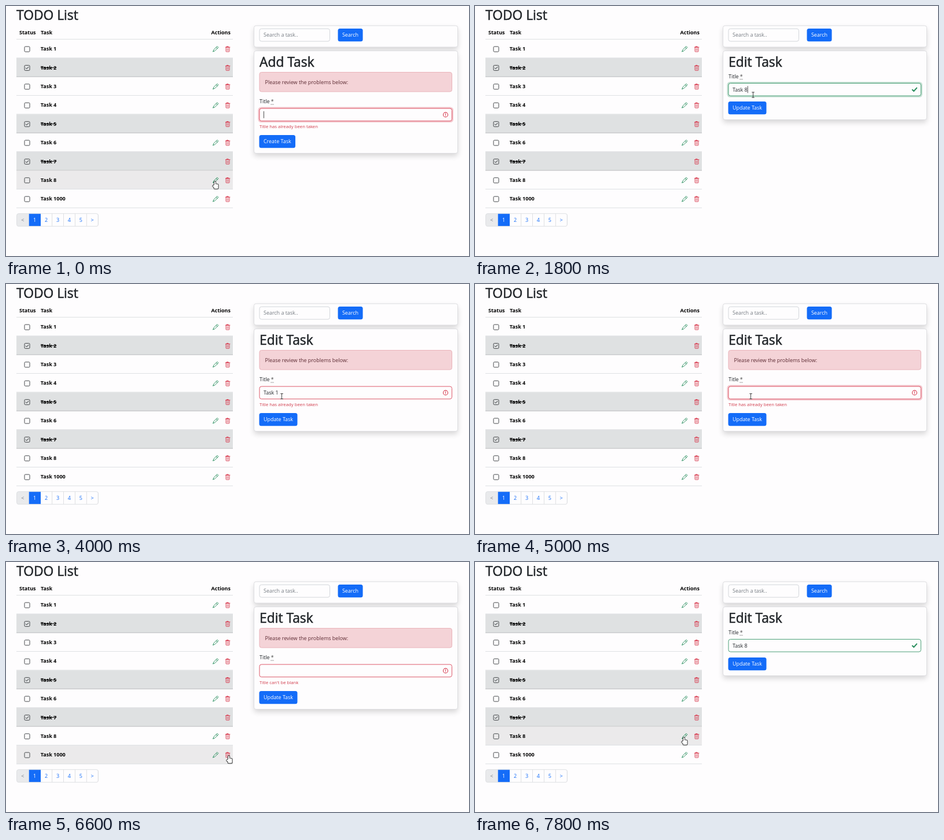
These frames come from a looping animation (800x432 px, 8000 ms). An HTML page with a canvas:

```html
<!DOCTYPE html>
<html lang="en">
<head>
<meta charset="utf-8">
<title>TODO List</title>
<style>
  html, body { margin: 0; width: 100%; height: 100%; overflow: hidden; background: #fefdfe; }
  canvas { display: block; }
</style>
</head>
<body>
<canvas id="stage" width="800" height="432"></canvas>
<script>
const ctx = document.getElementById('stage').getContext('2d');
const LOOP = 8000, STEP = 200, GLIDE = 500, BLINK = 1000;
const PAGE = '#fefdfe', INK = '#212529', BLUE = '#146cf8', HOVER_BLUE = '#0b5ed7';
const GREEN = '#2b8f5f', RED = '#d73c50', LINE = '#dee0e3', GREY = '#757b82';

const TABLE = { x: 18, w: 374, top: 57.1, row: 32.38 };
const TASKS = [1, 2, 3, 4, 5, 6, 7, 8, 1000];
const DONE = [2, 5, 7];
const PENCIL_X = 362, TRASH_X = 383;
const SEARCH = { x: 438, y: 39.3, w: 121.5, h: 21.7 };
const FIND = { x: 573.5, y: 39, w: 43, h: 22.3 };

// Each state adds its changes to the one before.
const TAKEN = 'Title has already been taken', BLANK = "Title can't be blank";
const EDIT = { mode: 'Edit', error: '', value: 'Task 8', eraseAt: Infinity, focus: false, busy: false };
const STATES = [
  [0, { ...EDIT, mode: 'Add', error: TAKEN, value: '', focus: true }],
  [400, EDIT],
  [1600, { focus: true }],
  [2200, { value: 'Task ' }],
  [2600, { value: 'Task 1' }],
  [3200, { focus: false, busy: true }],
  [3400, { error: TAKEN, busy: false }],
  [4200, { focus: true }],
  [4400, { eraseAt: 4400 }],
  [5600, { focus: false, busy: true }],
  [6000, { error: BLANK, busy: false }],
  [7200, EDIT]
];

// Places the pointer rests at, with the time it gets there.
const EDIT_ICON = { x: 361, y: 303.2 };
const STOPS = [
  { at: 0, ...EDIT_ICON },
  { at: 1400, x: 480.5, y: 153.5 },
  { at: 3400, x: 485, y: 175 },
  { at: 4000, x: 476.5, y: 194 },
  { at: 5500, x: 484, y: 234 },
  { at: 6600, x: 385, y: 335 },
  { at: 7000, ...EDIT_ICON }
];

function stateAt(t) {
  const s = { since: 0 };
  for (const [at, change] of STATES) if (at <= t) Object.assign(s, change, { since: at });
  const erased = Math.max(0, Math.floor((t - s.eraseAt) / STEP) + 1) * 2;
  if (erased) s.value = s.value.slice(0, Math.max(0, s.value.length - erased));
  return s;
}

function pointerAt(t) {
  let p = STOPS[0];
  for (let i = 1; i < STOPS.length; i++) {
    const a = STOPS[i - 1], b = STOPS[i];
    const begin = Math.max(a.at, b.at - GLIDE);
    if (t < begin) break;
    const u = Math.min(1, (t - begin) / (b.at - begin)), k = u * u * (3 - 2 * u);
    p = { x: a.x + (b.x - a.x) * k, y: a.y + (b.y - a.y) * k };
  }
  return p;
}

function text(str, x, y, { color = INK, size = 8.95, weight = 400, align = 'left' } = {}) {
  ctx.font = `${weight} ${size}px "Open Sans", "Noto Sans", sans-serif`;
  ctx.textAlign = align;
  ctx.fillStyle = color;
  ctx.fillText(str, x, y);
  return ctx.measureText(str).width;
}

// Medium weight: regular letters with a thin outline.
function heading(str, x, y) {
  text(str, x, y, { size: 22.8 });
  ctx.strokeStyle = INK;
  ctx.lineWidth = 0.55;
  ctx.strokeText(str, x, y);
}

function rect(x, y, w, h, color) {
  ctx.fillStyle = color;
  ctx.fillRect(x, y, w, h);
}

function box(b, fill, stroke, r = 3.5, width = 1) {
  ctx.beginPath();
  ctx.roundRect(b.x, b.y, b.w, b.h, r);
  if (fill) { ctx.fillStyle = fill; ctx.fill(); }
  if (stroke) { ctx.strokeStyle = stroke; ctx.lineWidth = width; ctx.stroke(); }
}

// Runs a drawing with (x, y) as origin.
function at(x, y, paint, turn = 0) {
  ctx.save();
  ctx.translate(x, y);
  ctx.rotate(turn);
  ctx.lineJoin = ctx.lineCap = 'round';
  paint();
  ctx.restore();
}

function line(color, width, ...points) {
  ctx.beginPath();
  points.forEach(p => ctx.lineTo(...p));
  ctx.strokeStyle = color;
  ctx.lineWidth = width;
  ctx.stroke();
}

function pencil(x, y) {
  at(x, y, () => {
    line(GREEN, 0.9, [0, 6], [-1.4, 3], [-1.4, -5.6], [1.4, -5.6], [1.4, 3], [0, 6]);
    line(GREEN, 0.9, [-1.4, -3], [1.4, -3]);
  }, Math.PI / 4);
}

function trash(x, y) {
  at(x, y, () => {
    line(RED, 0.9, [-4, -3.3], [4, -3.3]);
    box({ x: -1.4, y: -4.5, w: 2.8, h: 1.2 }, null, RED, 0.3, 0.8);
    box({ x: -3, y: -3.3, w: 6, h: 7.8 }, null, RED, 0.8, 0.9);
    for (const d of [-1.2, 0, 1.2]) line(RED, 0.55, [d, -1.4], [d, 2.8]);
  });
}

const tick = (x, y, size, color, width) => at(x, y, () =>
  line(color, width, [-size, 0.1 * size], [-size / 3, 0.75 * size], [size, -0.75 * size]));

const inside = (p, b) => p.x >= b.x && p.x <= b.x + b.w && p.y >= b.y && p.y <= b.y + b.h;
const rowTop = i => TABLE.top + i * TABLE.row;
const hoveredRow = p => TASKS.findIndex((_, i) =>
  inside(p, { x: TABLE.x, y: rowTop(i), w: TABLE.w, h: TABLE.row }));

function drawTable(hover) {
  const { x, w, row } = TABLE, bold = { color: '#000', size: 9, weight: 700 };
  heading('TODO List', x, 24);
  text('Status', 23, 49, bold);
  text('Task', 60, 49, bold);
  text('Actions', 388, 49, { ...bold, align: 'right' });
  rect(x, TABLE.top - 0.2, w, 1, LINE);
  TASKS.forEach((n, i) => {
    const top = rowTop(i), mid = top + 17.4, done = DONE.includes(n);
    if (done) rect(x, top + 0.6, w, row, i === hover ? '#cfd1d3' : '#dfe1e2');
    else if (i === hover) rect(x, top + 0.8, w, row, '#ebeaeb');
    rect(x, top + row - 0.2, w, 1, done ? '#bdbfc1' : LINE);

    box({ x: 32, y: mid - 4.4, w: 9, h: 9 }, null, '#45484b', 1.5);
    if (done) tick(36.5, mid + 0.1, 2.3, INK, 1);
    const len = text('Task ' + n, 59.8, mid + 2.8, bold);
    if (done) rect(59.8, mid - 0.7, len, 1, '#000');
    else pencil(PENCIL_X, mid);
    trash(TRASH_X, mid);
  });
}

function drawPager() {
  const frame = { x: 18.5, y: 358.7, w: 141, h: 22 }, cell = 19.9;
  ctx.save();
  box(frame, PAGE);
  ctx.clip();
  [...'<12345>'].forEach((c, i) => {
    const x = i ? 39.7 + cell * (i - 1) : 18, w = i ? cell : 21.7;
    if (i === 0) rect(x, 358, w, 24, '#e9eaec');
    else if (i === 1) rect(x, 358, w + 0.4, 24, BLUE);
    else rect(x + w - 0.4, 358, 1, 24, LINE);
    const color = i === 0 ? GREY : i === 1 ? '#fff' : BLUE;
    text(c, x + w / 2, 373.1, { color, align: 'center' });
  });
  ctx.restore();
  box(frame, null, LINE);
}

function card(y, h) {
  const b = { x: 428.5, y, w: 352, h };
  ctx.save();
  ctx.shadowColor = 'rgba(0,0,0,.16)';
  ctx.shadowBlur = 9.6;
  ctx.shadowOffsetY = 4.8;
  box(b, PAGE);
  ctx.restore();
  box(b, null, '#dddde0');
}

function button(b, label, color) {
  box(b, color);
  text(label, b.x + b.w / 2, b.y + 14.4, { color: '#fff', align: 'center' });
}

function formLayout(s) {
  return {
    input: { x: 438, y: s.error ? 177 : 133.5, w: 332.5, h: 21.7 },
    submit: { x: 437.5, y: s.error ? 223 : 165, w: s.mode === 'Add' ? 62.5 : 66, h: 22.3 }
  };
}

function drawSearch(p) {
  card(34, 37);
  box(SEARCH, PAGE, '#d3d6da');
  text('Search a task..', 445, 53.4, { color: GREY });
  button(FIND, 'Search', inside(p, FIND) ? HOVER_BLUE : BLUE);
}

function drawField(b, s, t) {
  const bad = !!s.error, tone = bad ? RED : GREEN, grow = 2.6;
  if (s.focus) {
    ctx.globalAlpha = 0.27;
    box({ x: b.x - grow, y: b.y - grow, w: b.w + 2 * grow, h: b.h + 2 * grow }, tone, null, 5.5);
    ctx.globalAlpha = 1;
  }
  box(b, PAGE, tone, 3.5, 0.85);
  const len = text(s.value, 445, b.y + 14.1);
  if (s.focus && (t - s.since) % BLINK < BLINK / 2) rect(445.2 + len, b.y + 4.8, 0.8, 12, '#222');

  const x = 759.5, y = b.y + 10.9;
  if (!bad) return tick(x, y, 3.7, GREEN, 2.1);
  box({ x: x - 4, y: y - 4, w: 8, h: 8 }, null, RED, 4, 1.1);
  rect(x - 0.55, y - 2.3, 1.1, 2.7, RED);
  rect(x - 0.55, y + 1.1, 1.1, 1.1, RED);
}

function drawForm(s, t, p) {
  const { input, submit } = formLayout(s), labelY = input.y - 8.8;
  card(77.5, s.error ? 177 : 119);
  heading(s.mode + ' Task', 438, 105);
  if (s.error) {
    box({ x: 438, y: 114.5, w: 332.5, h: 33.5 }, '#f4d3d7', '#e9b3ba');
    text('Please review the problems below:', 447.5, 134.9, { color: '#5c2a32' });
    text(s.error, 438, 211, { color: '#d03b4b', size: 7.75 });
  }
  text('Title', 438, labelY);
  text('*', 457.7, labelY, { color: '#444' });
  for (let x = 457.5; x < 462; x += 2) rect(x, labelY + 1.4, 1, 1, '#555');
  drawField(input, s, t);
  const color = s.busy ? '#6296ea' : inside(p, submit) ? HOVER_BLUE : BLUE;
  button(submit, s.mode === 'Add' ? 'Create Task' : 'Update Task', color);
}

function cursorKind(p, s, row) {
  const { input, submit } = formLayout(s);
  if (inside(p, input) || inside(p, SEARCH)) return 'text';
  if ((inside(p, submit) && !s.busy) || inside(p, FIND)) return 'hand';
  const onIcon = [PENCIL_X, TRASH_X].some(x => Math.abs(p.x - x) < 6);
  return row >= 0 && onIcon && Math.abs(p.y - rowTop(row) - 17.4) < 9 ? 'hand' : 'arrow';
}

const CURSORS = {
  text() {
    line('#333', 0.9, [0, -4.5], [0, 4.5]);
    for (const y of [-4.5, 4.5]) line('#333', 0.9, [-2, y], [2, y]);
  },
  hand() {
    const parts = [
      { x: -1, y: 0, w: 2.2, h: 9 },
      { x: -3.8, y: 6.8, w: 5, h: 2.4 },
      { x: -1.6, y: 4.6, w: 7.2, h: 8 }
    ];
    parts.forEach(b => box(b, null, '#222', 1.6, 1.8));
    parts.forEach(b => box(b, '#fff', null, 1.6));
  },
  arrow() {
    line('#222', 0.9, [0, 0], [0, 10.2], [2.3, 8.2], [3.8, 11.4], [5.3, 10.7], [3.9, 7.6], [6.9, 7.4], [0, 0]);
    ctx.fillStyle = '#fff';
    ctx.fill();
  }
};

function draw(now) {
  const t = Math.floor((now % LOOP) / STEP) * STEP;
  const s = stateAt(t), p = pointerAt(t), row = hoveredRow(p);
  rect(0, 0, 800, 432, PAGE);
  drawTable(row);
  drawPager();
  drawSearch(p);
  drawForm(s, t, p);
  at(p.x, p.y, CURSORS[cursorKind(p, s, row)]);
}

const start = performance.now();
function frame() {
  draw(performance.now() - start);
  requestAnimationFrame(frame);
}
frame();
</script>
</body>
</html>
```
